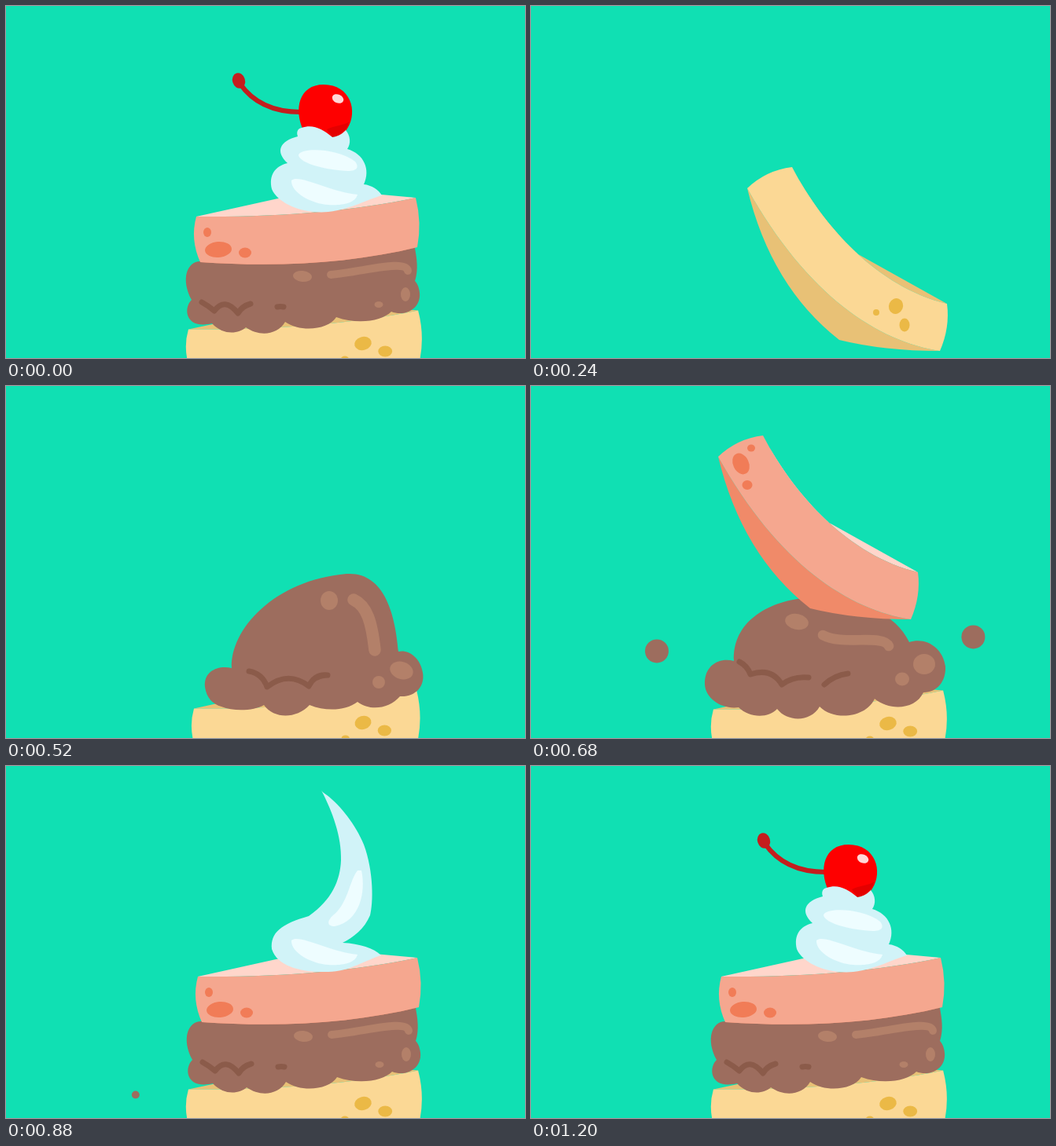
Write an HTML page with a canvas that moves like this. It is 660 px wide and 448 px high and loops after 1840 ms.

```html
<!DOCTYPE html>
<html lang="en">
<head>
<meta charset="utf-8">
<title>Layer cake</title>
<style>
html, body { margin: 0; width: 100%; height: 100%; overflow: hidden; background: #10e0b3; }
canvas { display: block; }
</style>
</head>
<body>
<canvas id="stage" width="660" height="448"></canvas>
<script>
const ctx = document.getElementById('stage').getContext('2d');
const LOOP = 1840, STEP = 40;

// Linear keyframes: [time, value, time, value, ...]
function at(t, keys) {
  if (t <= keys[0]) return keys[1];
  for (let i = 2; i < keys.length; i += 2) {
    if (t < keys[i]) {
      const k = (t - keys[i - 2]) / (keys[i] - keys[i - 2]);
      return keys[i - 1] + (keys[i + 1] - keys[i - 1]) * k;
    }
  }
  return keys[keys.length - 1];
}

// Blends two path strings that share the same commands
function mix(a, b, k) {
  const target = b.match(/-?[\d.]+/g);
  let i = 0;
  return a.replace(/-?[\d.]+/g, v => (+v + (target[i++] - v) * k).toFixed(2));
}

function pose(list, p) {
  const i = Math.max(0, Math.min(list.length - 2, Math.floor(p)));
  return mix(list[i], list[i + 1], p - i);
}

function fill(path, color) {
  ctx.fillStyle = color;
  ctx.fill(new Path2D(path));
}

function stroke(path, color, width) {
  ctx.strokeStyle = color;
  ctx.lineWidth = width;
  ctx.lineCap = ctx.lineJoin = 'round';
  ctx.stroke(new Path2D(path));
}

function oval(spec, color) {
  const [x, y, rx, ry, turn = 0] = spec.split(' ').map(Number);
  ctx.fillStyle = color;
  ctx.beginPath();
  ctx.ellipse(x, y, Math.max(0, rx), Math.max(0, ry), turn, 0, 7);
  ctx.fill();
}

function moved(dx, dy, draw) {
  ctx.save();
  ctx.translate(dx, dy);
  draw();
  ctx.restore();
}

function scaled(x, y, sx, sy, draw) {
  ctx.save();
  ctx.translate(x, y);
  ctx.scale(sx, sy);
  ctx.translate(-x, -y);
  draw();
  ctx.restore();
}

// Each entry: swinging pose, flat pose
const SLAB = {
  top: ['M295 63L345 155L492 237C405 216 335 140 295 63Z',
        'M242 268L400 233L521 244C440 261 347 269 242 268Z'],
  under: ['M238 90Q268 215 355 283Q412 297 483 297C405 285 315 228 238 90Z',
          'M247 326Q320 325 400 325Q460 320 523 307C441 327 349 333 247 326Z'],
  front: ['M295 63C335 140 405 216 492 237Q496 267 483 297C405 285 315 228 238 90Q262 67 295 63Z',
          'M242 268C347 269 440 261 521 244Q529 276 523 307C441 327 349 333 247 326Q234 297 242 268Z']
};
const SPONGE = {
  top: '#e8c176', under: '#e8c176', front: '#fbd895', dot: '#ebb946',
  dots: [['427 240 9 10 .4', '454 286 10.5 8.5 -.3'], ['438 264 6.5 8.5 0', '481 296 8.5 7 0'],
         ['402 248 4 4 0', '432 306 5 4 0']]
};
const BERRY = {
  top: '#ffd6cb', under: '#f08a69', front: '#f5a78f', dot: '#f17c57',
  dots: [['267 99 10 14 -.45', '270 310 17 10 -.08'], ['280 79 5 4.5 0', '256 288 5 6 0'],
         ['275 126 6.5 6 0', '304 314 8 6.5 0']]
};

function slab(style, t, swing) {
  const s = t - swing;
  if (s < -80) return;
  const flat = at(s, [0, 0, 40, 0.7, 80, 1.06, 120, 0.98, 160, 1]);
  const fall = at(s, [-80, 1, 0, 0]);
  moved(-60 * fall, -295 * fall, () => {
    for (const part of ['top', 'under', 'front']) fill(mix(...SLAB[part], flat), style[part]);
    for (const [a, b] of style.dots) oval(mix(a, b, flat), style.dot);
  });
}

const CHOC = '#9d6d5e', SHINE = '#b38069', CREASE = '#8b5b4a';

// Chocolate poses: splat, dome, pressed
const MOUSSE = [
  'M286 359C270 355 250 362 252 383C254 397 262 405 273 408C290 415 315 413 327 406C340 424 368 424 385 406C405 414 430 414 446 402C462 414 486 411 500 395C520 396 532 382 529 365C526 345 510 335 498 338C494 290 480 236 432 239C340 247 284 310 286 359Z',
  'M257 350C239 345 219 355 220 380C221 398 242 412 263 409C277 423 301 423 312 411C325 428 355 428 366 408C385 427 425 422 436 398C455 414 488 412 498 390C516 390 527 375 526 357C523 333 501 319 480 326C463 290 420 270 345 270C300 275 255 300 257 350Z',
  'M247 325C230 325 222 348 236 374C225 385 228 412 262 404C277 420 296 417 305 409C322 421 345 419 355 402C375 416 410 412 420 396C448 406 478 401 490 389C508 396 528 385 526 365C525 356 522 352 520 350C525 335 522 320 520 308C480 295 300 295 247 325Z'
];
const STREAK = ['M441 272C458 280 464 300 468 336', 'M370 317C395 331 447 315 454 331',
                'M413 342C455 338 508 322 511 337'];
const FOLD = [
  'M308 363Q325 366 331 383Q358 362 384 382Q392 366 408 368M395 371Q400 368 408 368',
  'M264 351Q274 356 278 367Q305 358 318 380Q332 369 352 371M372 380Q385 368 402 366',
  'M249 377Q258 382 265 388Q278 370 295 391Q300 382 311 379M345 383Q349 382 353 383'
];
const GLINTS = [
  ['410 273 11 12 0', '337 300 15 10 .2', '377 344 12 7 .1'],
  ['502 362 15 11 .3', '499 354 14 13 0', '508 367 6 9 0'],
  ['473 377 8 8 0', '471 373 9 8.5 0', '474 380 5.5 4 0']
];

function chocolate(t) {
  if (t < 360) return;
  if (t < 440) {
    const k = at(t, [360, 1, 400, 0]);
    moved(130 * k, -180 * k, () => {
      fill('M400 394C375 394 366 370 369 340C375 260 440 106 495 106C525 106 538 145 531 180C515 290 445 394 400 394Z', CHOC);
      oval('503 148 6 11 .1', SHINE);
      fill('M498 174C506 175 506 200 499 222C490 250 474 280 462 280C454 278 457 268 464 257C484 220 488 178 498 174Z', SHINE);
    });
    return;
  }
  const p = at(t, [520, 0, 600, 0.7, 680, 1, 720, 1.7, 760, 2.04, 800, 2]);
  const sx = at(t, [440, 0.78, 480, 0.94, 520, 1]);
  const sy = at(t, [440, 1.3, 480, 1.12, 520, 1]);
  moved(at(t, [840, 1, 880, 1, 920, 0]), 0, () => scaled(390, 405, sx, sy, () => {
    fill(pose(MOUSSE, p), CHOC);
    stroke(pose(FOLD, p), CREASE, 7);
    for (const glint of GLINTS) oval(pose(glint, p), SHINE);
    stroke(pose(STREAK, p), SHINE, 15.5 - 2.8 * p);
  }));
}

function drop(s, x, y, vx, vy, life) {
  if (s < 0 || s >= life) return;
  const r = 15 * Math.min(1, (life - s) / 160);
  oval([x + vx * s, y + vy * s + 0.001 * s * s, r, r].join(' '), CHOC);
}

const CREAM = [
  'M401 31C402 33 405 35 408 37C425 50 445 75 455 100C468 135 467 175 463 190C456 207 442 218 428 225C450 226 468 232 477 241C460 246 435 262 410 262C375 263 345 255 338 233C336 212 350 201 385 191C415 170 425 145 426 120C427 90 415 58 401 31Z',
  'M376 155C390 150 402 156 415 167C424 166 429 161 432 158C438 165 439 175 434 182C455 188 464 208 455 227C465 228 474 234 478 241C460 246 440 258 410 262C375 265 345 250 338 233C334 215 342 204 358 200C342 185 348 172 371 166C369 160 371 156 376 155Z'
];
const CREAM_SHINE = [
  'M452 133C458 160 450 198 418 204C408 204 408 197 416 190C435 175 437 145 447 133Z',
  'M444 198C450 206 445 210 435 210C410 209 374 201 372 190C373 180 420 180 444 198Z'
];

function cream(t) {
  if (t < 840) return;
  const p = at(t, [880, 0, 920, 0.45, 960, 0.85, 1000, 1.05, 1040, 1]);
  const sx = at(t, [1040, 1, 1080, 1.08, 1120, 1.12, 1160, 1.04, 1200, 1]);
  const sy = at(t, [1040, 1, 1080, 0.94, 1120, 0.93, 1160, 0.98, 1200, 1]);
  moved(0, at(t, [840, -120, 880, 0]), () => scaled(410, 262, sx, sy, () => {
    fill(pose(CREAM, p), '#d1f3f8');
    fill(pose(CREAM_SHINE, p), '#eefdff');
    fill('M363 222C372 213 410 236 447 240C444 252 425 254 410 253C390 252 362 238 363 222Z', '#eefdff');
  }));
}

function cherry(t) {
  if (t < 1000) return;
  moved(0, at(t, [1000, -190, 1040, -90, 1080, 12, 1120, 8, 1160, 2, 1200, 0]), () => {
    stroke('M297 98Q322 135 375 135', '#c41e1e', 6);
    oval('296 95 8 10 -.3', '#c41e1e');
    fill('M378 158C366 132 372 100 404 100C438 100 448 134 434 156C428 166 418 168 411 166Z', '#fe0000');
    fill('M437 147C430 152 418 152 408 157L415 167C426 165 434 158 437 147Z', '#e40000');
    oval('422 118 7.5 5.5 .4', '#ffd7d7');
  });
}

function draw(t) {
  ctx.fillStyle = '#10e0b3';
  ctx.fillRect(0, 0, 660, 448);
  if (t < 40) t = LOOP;

  // The sponge widens under the weight of the chocolate
  const k = at(t, [400, 0, 520, 0.3, 600, 0.8, 680, 1]);
  ctx.save();
  ctx.transform(1 + 0.047 * k, 0, 0, 1, -21.4 * k, 142 + 1.5 * k);
  ctx.translate(at(t, [240, 37, 320, 0]), 0);
  slab(SPONGE, t, 240);
  ctx.restore();

  drop(t - 560, 226, 365, -0.55, -0.35, 280);
  drop(t - 560, 494, 347, 0.57, -0.35, 280);
  drop(t - 720, 240, 380, -0.47, 0.08, 213);
  chocolate(t);
  moved(at(t, [720, 0, 760, 2, 880, 2, 920, 0]), 0, () => slab(BERRY, t, 680));
  cherry(t);
  cream(t);
}

const start = performance.now();
function tick() {
  const t = (performance.now() - start) % LOOP;
  draw(Math.floor(t / STEP) * STEP);
  requestAnimationFrame(tick);
}
tick();
</script>
</body>
</html>
```
